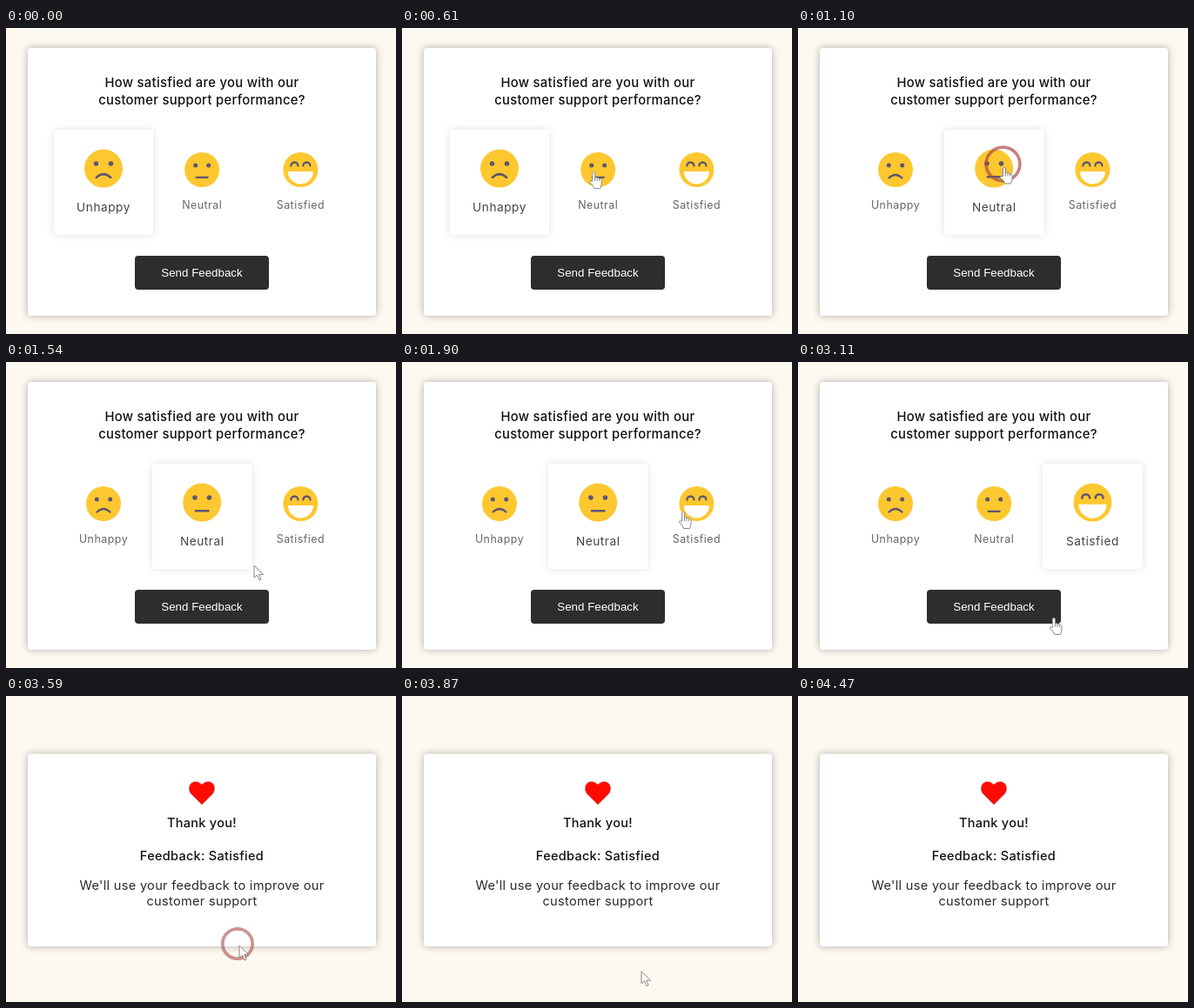
An HTML page for the animation above (4760 ms loop, 448x352 px).

```html
<!DOCTYPE html>
<html lang="en">
<head>
<meta charset="utf-8">
<title>Feedback form</title>
<style>
  html, body { margin: 0; width: 100%; height: 100%; overflow: hidden; background: #fdf8f0; }
  svg { display: block; width: 448px; height: 352px; }
  text { font-family: Inter, "Open Sans", sans-serif; text-anchor: middle; fill: #111; letter-spacing: .02em; }
  .panel { fill: #fff; filter: drop-shadow(0 0 4px rgba(0, 0, 0, .3)); }
  .strong { font-weight: 500; font-size: 14.5px; }
  .head { font-weight: 500; font-size: 14.8px; }
  .body { font-size: 14.6px; fill: #2a2a2a; }
  .button { font: 13.333px "Liberation Sans", Arial, sans-serif; fill: #fff; letter-spacing: 0; }
  .option text { font-size: 12.4px; fill: #666; letter-spacing: .04em; }
  .option .tile { fill: #fff; visibility: hidden; filter: drop-shadow(0 0 4px rgba(0, 0, 0, .12)); }
  .option.on text { fill: #444; }
  .option.on .tile { visibility: inherit; }
  .skin { fill: #fdc72f; }
  .eye { fill: #5d5670; }
  .line { fill: none; stroke: #5d5670; stroke-width: 2.3; stroke-linecap: round; }
  #pointer path { fill: #fff; stroke: #888; stroke-linejoin: round; }
  #ring { fill: none; stroke: #ad4a4a; stroke-width: 3.7; }
</style>
</head>
<body>
<svg viewBox="0 0 448 352">
  <g id="form">
    <rect class="panel" x="25" y="23" width="400" height="308" rx="4"/>
    <text class="head" x="225" y="68">How satisfied are you with our</text>
    <text class="head" x="225" y="88">customer support performance?</text>
    <g class="option">
      <rect class="tile" x="-52" y="-55" width="104" height="110" rx="3"/>
      <g transform="translate(0 -14.5)">
        <circle class="skin" r="20"/>
        <circle class="eye" cx="-7.7" cy="-5" r="2.5"/><circle class="eye" cx="7.7" cy="-5" r="2.5"/>
        <path class="line" d="M-7.5 9.5Q0 2.500 7.5 9.5"/>
      </g>
      <text y="30.5">Unhappy</text>
    </g>
    <g class="option">
      <rect class="tile" x="-52" y="-55" width="104" height="110" rx="3"/>
      <g transform="translate(0 -14.5)">
        <circle class="skin" r="20"/>
        <circle class="eye" cx="-7.5" cy="-5" r="2.5"/><circle class="eye" cx="7.5" cy="-5" r="2.5"/>
        <path class="line" d="M-6.5 8.8H6.5"/>
      </g>
      <text y="30.5">Neutral</text>
    </g>
    <g class="option">
      <rect class="tile" x="-52" y="-55" width="104" height="110" rx="3"/>
      <g transform="translate(0 -14.5)">
        <circle class="skin" r="20"/>
        <path class="line" d="M-11 -4.5a4 4 0 0 1 8 0M3 -4.5a4 4 0 0 1 8 0"/>
        <path fill="#fff" d="M-14.5 2H14.5A14.5 14.5 0 0 1 -14.5 2Z"/>
      </g>
      <text y="30.5">Satisfied</text>
    </g>
    <rect x="148" y="262" width="154" height="39" rx="4" fill="#2e2d2b"/>
    <text class="button" x="225" y="286">Send Feedback</text>
  </g>
  <g id="thanks">
    <rect class="panel" x="25" y="66.5" width="400" height="221.5" rx="4"/>
    <path transform="translate(0 .6)" fill="#ff0a00" stroke="#b99" stroke-width=".5" d="M225 124.500L212.500 112C209 107.500 209.500 100.500 215 98.300C219 97 222 98.300 225 101.300C228 98.300 231 97 235 98.300C240.500 100.500 241 107.500 237.500 112Z"/>
    <text class="strong" x="225" y="151">Thank you!</text>
    <text class="strong" x="225" y="189">Feedback: Satisfied</text>
    <text class="body" x="225" y="222.5">We'll use your feedback to improve our</text>
    <text class="body" x="225" y="240.5">customer support</text>
  </g>
  <circle id="ring"/>
  <g id="pointer">
    <path id="arrow" d="M0 0V14L3.500 11L6 17L8 16L5.700 10.500H10.500Z"/>
    <path id="hand" d="M-1.500 11.500V1.500Q0 -1 1.500 1.500V7Q3 6 4 7.500Q5.500 6.500 6.500 8.500Q8 7.500 9 9.500V14Q9 16 7.500 19.500H0.500Q0 16 -4.500 12.500Q-5 9.500 -1.500 11.500ZM1.500 7V11M4 7.500V11M6.500 8.500V11"/>
  </g>
</svg>
<script>
const LOOP = 4760, NEUTRAL = 1020, SATISFIED = 2350, SENT = 3510;
const $ = id => document.getElementById(id);
const show = (el, on) => { el.style.visibility = on ? "inherit" : "hidden"; };
const options = [...document.querySelectorAll(".option")];

// time, x, y of the pointer tip
const path = [
  [200, 173, 207], [240, 203, 171], [530, 203, 171], [690, 237, 159.5],
  [1180, 237, 159.5], [1540, 285, 234], [1580, 285, 234], [1900, 323, 172],
  [2350, 323, 172], [2470, 340, 270], [2590, 340, 270], [2790, 339, 293],
  [2950, 339, 293], [3110, 294, 294], [3310, 268, 287], [3590, 268, 287],
  [3950, 277, 325], [4150, 277, 325], [4470, 286, 353]
];
// start, x, y
const clicks = [[1020, 235.5, 156.5], [2350, 323, 172], [3540, 266, 285]];

function pointerAt(t) {
  const i = Math.max(1, path.findIndex(p => p[0] > t));
  const [a, b] = [path[i - 1], path[i]];
  const k = (t - a[0]) / (b[0] - a[0]);
  return [a[1] + (b[1] - a[1]) * k, a[2] + (b[2] - a[2]) * k];
}

function draw(t) {
  const sent = t >= SENT;
  show($("form"), !sent);
  show($("thanks"), sent);

  const chosen = t < NEUTRAL ? 0 : t < SATISFIED ? 1 : 2;
  options.forEach((el, i) => {
    el.classList.toggle("on", i === chosen);
    el.setAttribute("transform", `translate(${112 + 113.2 * i} 177.5) scale(${i === chosen ? 1.1 : 1})`);
  });

  const click = clicks.find(c => t >= c[0] && t < c[0] + 240);
  show($("ring"), click);
  if (click) {
    const grow = Math.min((t - click[0]) / 120, 1), ring = $("ring");
    ring.setAttribute("cx", click[1]);
    ring.setAttribute("cy", click[2]);
    ring.setAttribute("r", 13.5 + 8.7 * grow);
    ring.setAttribute("opacity", 0.45 + 0.35 * grow);
  }

  const visible = t >= 200 && t < 4470;
  show($("pointer"), visible);
  if (visible) {
    const hand = t < 1420 || (t > 1700 && !sent);
    show($("hand"), hand);
    show($("arrow"), !hand);
    $("pointer").setAttribute("transform", `translate(${pointerAt(t)})`);
  }
}

const start = performance.now();
function tick() {
  draw((performance.now() - start) % LOOP);
  requestAnimationFrame(tick);
}
tick();
</script>
</body>
</html>
```
